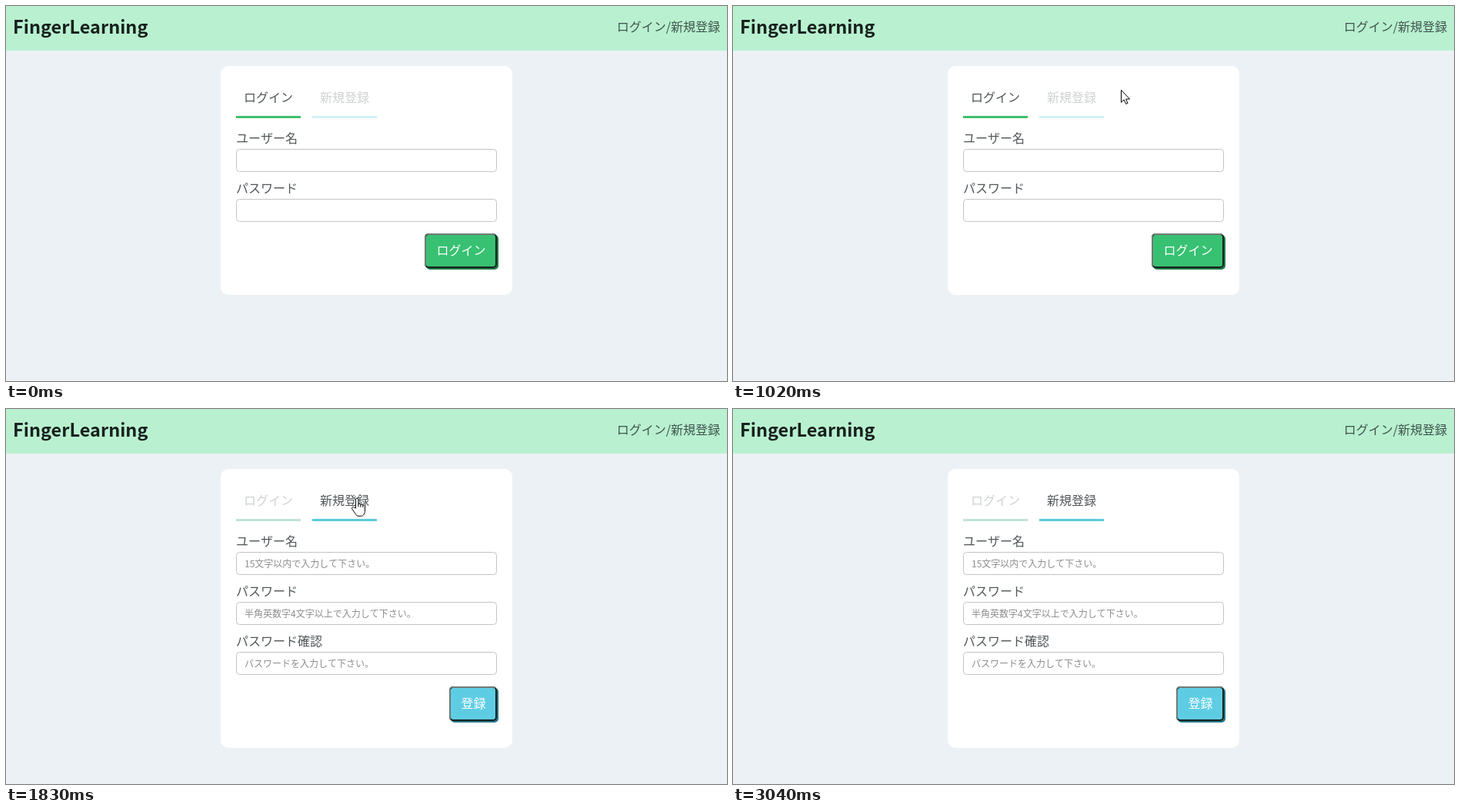
An HTML page with a canvas for the animation above (3.59 s loop, 937 px wide and 488 px high).

```html
<!DOCTYPE html>
<html lang="ja">
<head>
<meta charset="utf-8">
<title>Login form</title>
<style>
html, body { margin: 0; width: 100%; height: 100%; overflow: hidden; background: #ecf1f5; }
canvas { display: block; }
</style>
</head>
<body>
<canvas id="stage" width="937" height="488"></canvas>
<script>
const ctx = document.getElementById('stage').getContext('2d');
const LOOP = 3590;
const PRESS = 1750;
const SWITCH = 1830;
const FAMILY = '"Noto Sans CJK JP", "Noto Sans CJK", "Noto Sans", sans-serif';
const INK = 'rgba(20, 28, 32, .74)'; // translucent, so the strokes read as a light weight

const GREEN = { face: '#38c172', shade: '#207a4a', line: '#3fbf70', faded: '#c1e3d3' };
const CYAN = { face: '#5ecde3', shade: '#227586', line: '#5bcbdc', faded: '#d2f1f5' };

// Pointer strokes advance in fixed steps; each key is [step, x, y].
const strokes = [
  { from: 400, until: 2360, step: 68.7, keys: [
    [0, 893, 457], [2, 833, 342], [4, 746, 221], [5, 690, 170], [7, 572, 107],
    [9, 504, 109], [10, 480, 112], [12, 458, 116], [14, 455, 117]] },
  { from: 2360, until: 3040, step: 67.7, keys: [
    [0, 463, 116], [1, 503, 120], [3, 632, 162], [5, 752, 250],
    [7, 859, 380], [9, 899, 459]] }
];

const arrow = new Path2D('M.5.5V16.5L4.2 13 6.7 18.5 9 17.5 6.6 12.1H11.6Z');
const hand = new Path2D('M-.5 12V.8a1.7 1.7 0 0 1 3.4 0V7a1.7 1.7 0 0 1 3 .8' +
  'a1.7 1.7 0 0 1 3 .8a1.6 1.6 0 0 1 2.6 .9V15c0 4-2 7.3-4.8 7.3H3' +
  'c-2.5 0-4-3-5.5-5.2L-5.2 13c-1-2 1-3.2 2.6-1.8Z' +
  'M2.9 7v3.5M5.9 7.8v3M8.9 8.6v2.4');

function text(str, x, y, { size = 16, weight = 300, color = INK, align = 'left' } = {}) {
  ctx.font = `${weight} ${size}px ${FAMILY}`;
  ctx.textAlign = align;
  ctx.fillStyle = color;
  ctx.fillText(str, x, y);
}

function box(x, y, w, h, r, color) {
  ctx.fillStyle = color;
  ctx.beginPath();
  ctx.roundRect(x, y, w, h, r);
  ctx.fill();
}

function tab(label, x, active, colors) {
  text(label, x + 10, 125, { color: active ? INK : '#cfd2d2' });
  ctx.fillStyle = active ? colors.line : colors.faded;
  ctx.fillRect(x, 143, 84, 3);
}

function field(label, y, hint = '') {
  text(label, 299, y - 8);
  ctx.strokeStyle = '#c4c4c4';
  ctx.lineWidth = 1;
  ctx.beginPath();
  ctx.roundRect(299.5, y + .5, 338, 29, 4);
  ctx.stroke();
  text(hint, 310, y + 20, { size: 12, color: '#8c8c8c' });
}

function button(label, x, y, w, colors) {
  const h = 45, right = x + w, bottom = y + h;
  box(x + 2, y + 2, w, h, 5, colors.shade);
  box(x, y, w, h, 5, '#17201d');
  ctx.save();
  ctx.clip();
  ctx.fillStyle = '#737977';
  ctx.beginPath();
  ctx.moveTo(x, y);
  ctx.lineTo(right, y);
  ctx.lineTo(right - 2, y + 2);
  ctx.lineTo(x + 2, y + 2);
  ctx.lineTo(x + 2, bottom - 2);
  ctx.lineTo(x, bottom);
  ctx.fill();
  ctx.restore();
  box(x + 2, y + 2, w - 4, h - 4, 3, colors.face);
  text(label, x + 15.5, y + 28, { color: '#fff', weight: 400 });
}

function drawPage(registering) {
  ctx.fillStyle = '#ecf1f5';
  ctx.fillRect(0, 0, 937, 488);
  ctx.fillStyle = '#b9f1d0';
  ctx.fillRect(0, 0, 937, 58);
  text('FingerLearning', 9, 36, { size: 23.5, weight: 700, color: '#17201d' });
  text('ログイン/新規登録', 928, 33, { align: 'right' });

  box(279, 78, 379, registering ? 363 : 298, 10, '#fff');
  tab('ログイン', 299, !registering, GREEN);
  tab('新規登録', 398, registering, CYAN);
  field('ユーザー名', 186, registering ? '15文字以内で入力して下さい。' : '');
  field('パスワード', 251, registering ? '半角英数字4文字以上で入力して下さい。' : '');
  if (registering) {
    field('パスワード確認', 316, 'パスワードを入力して下さい。');
    button('登録', 576, 361, 62, CYAN);
  } else {
    button('ログイン', 544, 296, 94, GREEN);
  }
}

function pointerAt(t) {
  const stroke = strokes.find(s => t >= s.from && t < s.until);
  if (!stroke) return null;
  const { keys } = stroke;
  const last = keys[keys.length - 1];
  const k = Math.min(Math.floor((t - stroke.from) / stroke.step), last[0]);
  const i = Math.max(1, keys.findIndex(key => key[0] >= k));
  const [k0, x0, y0] = keys[i - 1], [k1, x1, y1] = keys[i];
  const p = (k - k0) / (k1 - k0);
  return { x: Math.round(x0 + (x1 - x0) * p), y: Math.round(y0 + (y1 - y0) * p) };
}

function drawPointer({ x, y }) {
  const overTab = x >= 398 && x < 482 && y < 146;
  const shape = overTab ? hand : arrow;
  ctx.save();
  ctx.translate(x, y);
  ctx.fillStyle = '#fff';
  ctx.strokeStyle = '#000';
  ctx.lineWidth = 1;
  ctx.fill(shape);
  ctx.stroke(shape);
  ctx.restore();
}

function drawHighlight({ x, y }) {
  ctx.save();
  ctx.globalCompositeOperation = 'multiply';
  ctx.fillStyle = '#fdf873';
  ctx.beginPath();
  ctx.arc(x, y, 12.7, 0, Math.PI * 2);
  ctx.fill();
  ctx.restore();
}

function render(t) {
  drawPage(t >= SWITCH);
  const pointer = pointerAt(t);
  if (!pointer) return;
  drawPointer(pointer);
  if (t >= PRESS && t < SWITCH) drawHighlight(pointer);
}

function frame() {
  render(performance.now() % LOOP);
  requestAnimationFrame(frame);
}
frame();
</script>
</body>
</html>
```
